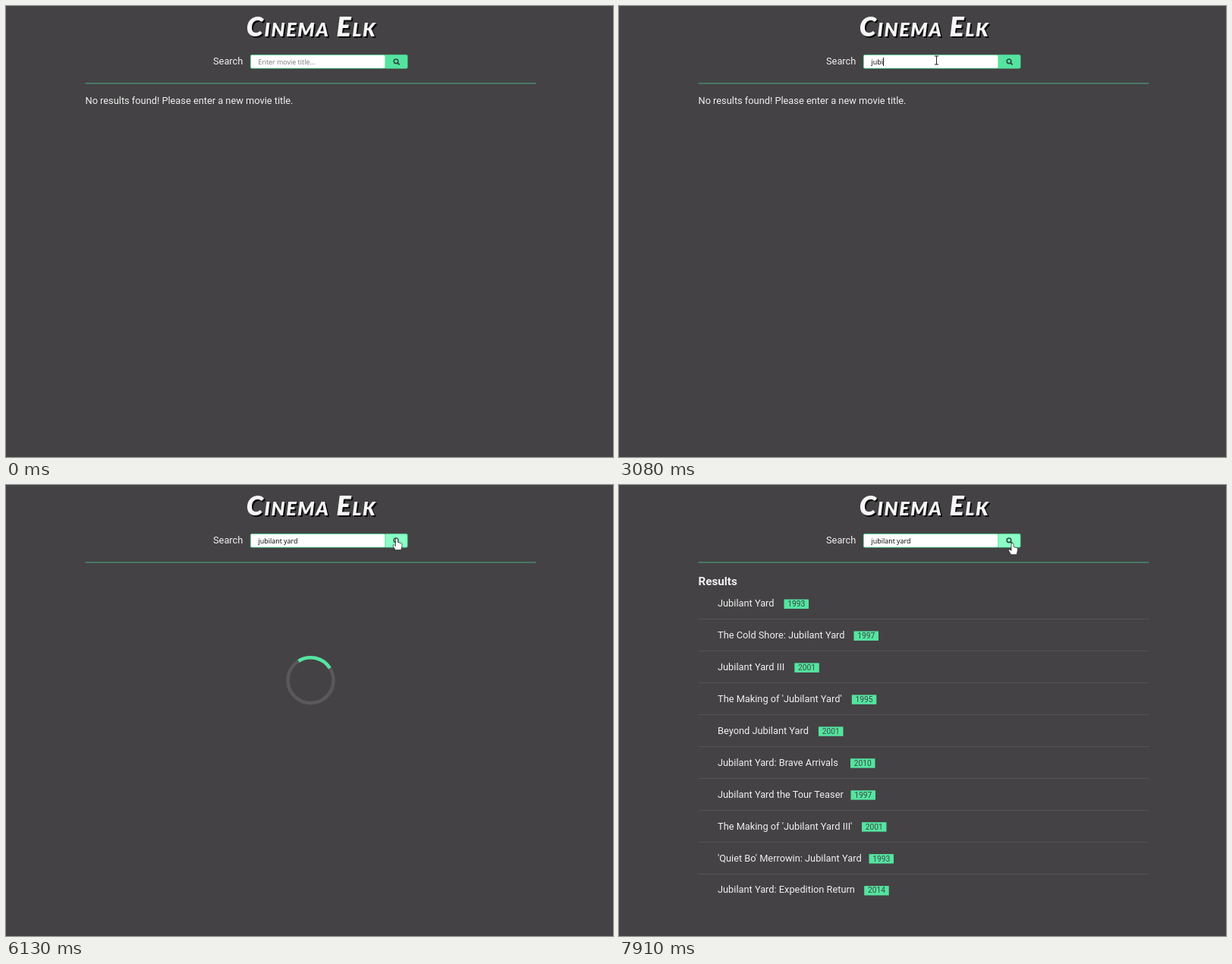
An HTML page for the animation above (7.99 s loop, 800 by 594 pixels).

```html
<!DOCTYPE html>
<html lang="en">
<head>
<meta charset="utf-8">
<title>Cinema Elk</title>
<style>
  html, body { margin: 0; width: 100%; height: 100%; overflow: hidden; background: #444244; }
  svg { display: block; width: 800px; height: 594px; }
  text { font: 12.8px Roboto, sans-serif; fill: #f0f0f0; white-space: pre; }
  #logo {
    font: italic 900 36px Lato, sans-serif; font-variant: small-caps; letter-spacing: 1.6px;
    fill: #f6f6f6; filter: drop-shadow(2px 2px 0 #0c0c0c);
  }
  #field { font: 8.93px "Open Sans", sans-serif; }
  .heading { font-weight: bold; font-size: 15.2px; }
  .year { font-size: 10.24px; fill: #3c4742; }
  .badge { fill: #54e4a0; }
  .rule { fill: #555356; }
</style>
</head>
<body>
<svg viewBox="0 0 800 594">
  <rect width="800" height="594" fill="#444244"/>
  <text id="logo" x="402.5" y="40" text-anchor="middle">Cinema Elk</text>
  <text x="273" y="76.5">Search</text>

  <rect x="322.4" y="64.4" width="177.6" height="17.7" rx="1.5" fill="#fff" stroke="#54e4a0" stroke-width=".8"/>
  <text id="field" x="332.5" y="76.6"></text>
  <rect id="caret" y="68" width="1" height="11" fill="#111"/>
  <path id="button" d="M500 64.4H527.5Q529 64.4 529 65.9V80.6Q529 82.1 527.5 82.1H500Z" stroke="#54e4a0" stroke-width=".8"/>
  <g fill="none" stroke="#2f4a40" stroke-width="1.6">
    <circle cx="514" cy="72.8" r="2.8"/>
    <path d="M516 74.8L518.6 77.4" stroke-width="2"/>
  </g>
  <rect x="104.5" y="101.2" width="594" height="1.4" fill="#4b8d72"/>

  <text id="empty" x="104.5" y="129.3">No results found! Please enter a new movie title.</text>

  <g id="loader" fill="none" stroke-width="4.5">
    <circle cx="401.5" cy="257.2" r="30" stroke="#5a585b"/>
    <path id="arc" d="M-21.2-21.2A30 30 0 0 1 21.2-21.2" stroke="#54e4a0"/>
  </g>

  <g id="results">
    <text class="heading" x="104.5" y="131.5">Results</text>
  </g>

  <g id="pointer">
    <path id="arrow" d="M0 0V11.6L2.6 9.2 4.3 13 6.2 12.2 4.5 8.4H8Z" fill="#fff" stroke="#111" stroke-width=".8"/>
    <path id="beam" d="M-2.5-5.5H2.5M-2.5 5.5H2.5M0-5.5V5.5" fill="none" stroke="#222"/>
    <path id="hand" d="M-1.5 1Q0-.8 1.5 1V5.2L6.2 6.5Q7.2 7 7 9L5.7 15.4H-1.9L-5 10Q-5.4 8.1-3.5 8.4L-1.5 10.2Z"
      fill="#fff" stroke="#222" stroke-width=".7"/>
  </g>
</svg>
<script>
const LOOP = 7990;
const STEP = 76.5;
const CLICK = 6130;
const LOADED = 6900;
const QUERY = 'jubilant yard';
const KEY_TIMES = [2700, 2850, 2930, 3080, 3160, 3400, 3550, 3630, 3780, 3950, 4020, 4100, 4250];
const CARET_ON = [[1480, 2000], [2530, 4650], [5200, 5750]];

// time, x, y of the pointer's hot spot
const PATH = [
  [530, 709, 580], [700, 640, 420], [900, 530, 220], [1100, 450, 110], [1290, 418, 74],
  [1370, 423, 69], [1500, 418.5, 71.5], [5130, 418.5, 71.5], [5500, 471, 83],
  [5800, 512, 64.5], [5980, 511, 64.2], [6110, 515, 70.2], [6790, 514, 71.8],
  [7740, 514, 71.8], [7870, 518.5, 76.3]
];

// title, year, badge position
const MOVIES = [
  ['Jubilant Yard', 1993, 217.5],
  ['The Cold Shore: Jubilant Yard', 1997, 309.5],
  ['Jubilant Yard III', 2001, 231.3],
  ["The Making of 'Jubilant Yard'", 1995, 306.8],
  ['Beyond Jubilant Yard', 2001, 263],
  ['Jubilant Yard: Brave Arrivals', 2010, 305],
  ['Jubilant Yard the Tour Teaser', 1997, 305.5],
  ["The Making of 'Jubilant Yard III'", 2001, 320],
  ["'Quiet Bo' Merrowin: Jubilant Yard", 1993, 329.5],
  ['Jubilant Yard: Expedition Return', 2014, 323.2]
];

const $ = id => document.getElementById(id);
const show = (id, on) => $(id).setAttribute('visibility', on ? 'visible' : 'hidden');

function add(tag, attrs, content = '') {
  const el = document.createElementNS('http://www.w3.org/2000/svg', tag);
  for (const name in attrs) el.setAttribute(name, attrs[name]);
  el.textContent = content;
  $('results').append(el);
}

MOVIES.forEach(([title, year, x], i) => {
  const y = 160 + i * 41.94;
  add('text', { x: 130, y }, title);
  add('rect', { class: 'badge', x, y: y - 9.4, width: 32.5, height: 12.4 });
  add('text', { class: 'year', x: x + 16.25, y, 'text-anchor': 'middle' }, year);
  if (i < MOVIES.length - 1) {
    add('rect', { class: 'rule', x: 104.5, y: Math.round(y + 16.2), width: 594, height: 1 });
  }
});

function pointerAt(t) {
  const next = PATH.findIndex(p => p[0] > t);
  if (next < 0) return PATH[PATH.length - 1].slice(1);
  if (next === 0) return PATH[0].slice(1);
  const [t0, x0, y0] = PATH[next - 1], [t1, x1, y1] = PATH[next];
  const k = (t - t0) / (t1 - t0);
  return [x0 + (x1 - x0) * k, y0 + (y1 - y0) * k];
}

function render(t) {
  const tick = 530 + Math.floor((t - 522) / STEP) * STEP;

  const [x, y] = pointerAt(tick);
  const inBar = y >= 64 && y <= 82.5;
  const overButton = inBar && x >= 500 && x <= 529;
  const overField = inBar && x >= 322 && x < 500;
  const moving = t >= 530;
  show('hand', moving && overButton);
  show('beam', moving && overField);
  show('arrow', moving && !overButton && !overField);
  $('pointer').setAttribute('transform', `translate(${x} ${y})`);
  $('button').setAttribute('fill', overButton ? '#8cfdc6' : '#54e4a0');

  const typed = QUERY.slice(0, KEY_TIMES.filter(k => k <= t).length);
  const field = $('field');
  field.textContent = typed || 'Enter movie title...';
  field.style.fill = typed ? '#000' : '#777';
  const width = typed ? field.getComputedTextLength() : 0;
  $('caret').setAttribute('x', Math.round(332.5 + width));
  show('caret', CARET_ON.some(([from, to]) => t >= from && t < to));

  show('empty', t < CLICK);
  show('loader', t >= CLICK && t < LOADED);
  show('results', t >= LOADED);
  const angle = 12.7 + (tick - 6114.5) * 360 / 552;
  $('arc').setAttribute('transform', `translate(401.5 257.2) rotate(${angle})`);
}

const start = performance.now();
function frame() {
  render((performance.now() - start) % LOOP);
  requestAnimationFrame(frame);
}
frame();
</script>
</body>
</html>
```
